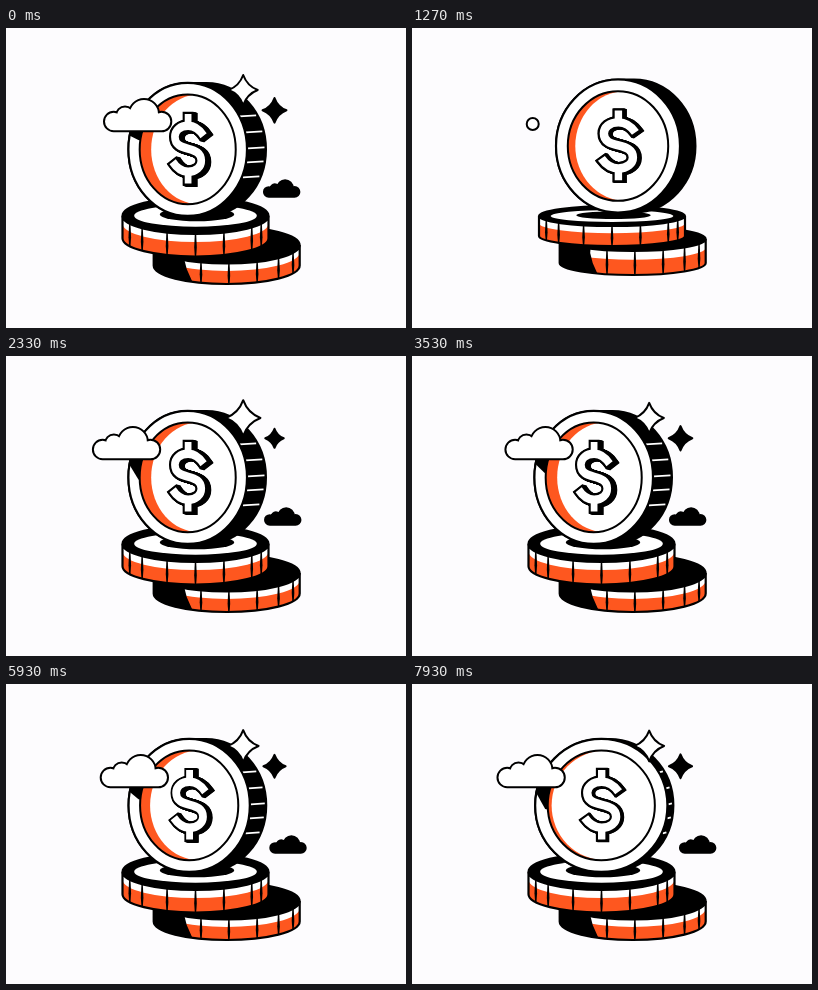
Recreate the animation shown at these times as an HTML page with a canvas. Size 400x300 px, loop 8000 ms.

```html
<!DOCTYPE html>
<html lang="en">
<head>
<meta charset="utf-8">
<title>Coins</title>
<style>
  html, body { margin: 0; width: 100%; height: 100%; overflow: hidden; background: #fdfcfe; }
  canvas { display: block; width: 400px; height: 300px; }
</style>
</head>
<body>
<canvas id="stage"></canvas>
<script>
const LOOP = 8000, STEP = 1000 / 15, TAU = Math.PI * 2;
const INK = '#000', PAPER = '#fff', ORANGE = '#fe571f', BACKDROP = '#fdfcfe';
const canvas = document.getElementById('stage');
const ctx = canvas.getContext('2d');
const ratio = window.devicePixelRatio || 1;
canvas.width = 400 * ratio;
canvas.height = 300 * ratio;

const lerp = (a, b, u) => a + (b - a) * u;
const part = (t, from, to) => Math.min(1, Math.max(0, (t - from) / (to - from)));
const smooth = u => u * u * (3 - 2 * u);
const easeOut = u => 1 - (1 - u) ** 3;
const backOut = (u, s) => 1 + (s + 1) * (u - 1) ** 3 + s * (u - 1) ** 2;

function paint(fill, stroke, width) {
  if (fill) { ctx.fillStyle = fill; ctx.fill(); }
  if (stroke) { ctx.strokeStyle = stroke; ctx.lineWidth = width; ctx.stroke(); }
}

function oval(cx, cy, rx, ry) {
  ctx.beginPath();
  ctx.ellipse(cx, cy, rx, ry, 0, 0, TAU);
}

function polygon(...points) {
  ctx.beginPath();
  points.forEach(([x, y]) => ctx.lineTo(x, y));
  ctx.closePath();
}

// Draws scaled around a point and lifted by dy.
function placed(x, y, scale, dy, draw) {
  if (scale <= 0.01) return;
  ctx.save();
  ctx.translate(x, y + dy);
  ctx.scale(scale, scale);
  ctx.translate(-x, -y);
  draw();
  ctx.restore();
}

function sidePath({ cx, cy, rx, ry, h }, drop = 0) {
  ctx.beginPath();
  ctx.ellipse(cx, cy + drop, rx, ry, 0, Math.PI, 0, true);
  ctx.ellipse(cx, cy + h, rx, ry, 0, 0, Math.PI);
  ctx.closePath();
}

function disc(d) {
  const { cx, cy, rx, ry, h } = d;
  oval(cx, cy, rx, ry);
  paint(INK, INK, 2);

  sidePath(d);
  paint(PAPER);
  ctx.save();
  ctx.clip();
  sidePath(d, h * 0.36);
  paint(ORANGE);
  for (const angle of d.ticks) {
    const x = cx + rx * Math.sin(angle), y = cy + ry * Math.cos(angle);
    polygon([x - 0.7, y], [x + 0.7, y], [x + 1.3, y + h * 0.6], [x + 0.6, y + h + 1], [x - 0.6, y + h + 1], [x - 1.3, y + h * 0.6]);
    paint(INK);
  }
  if (d.shaded) {
    polygon([cx - 80, cy - 20], [cx - 40, cy - 20], [cx - 42.5, cy + 14], [cx - 40, cy + 24], [cx - 32, cy + 42], [cx - 80, cy + 42]);
    paint(INK);
  }
  ctx.restore();
  sidePath(d);
  paint(null, INK, 2.2);

  if (!d.shaded) {
    oval(cx, cy, rx * 0.84, ry * 0.6);
    paint(PAPER);
    oval(cx + 1.5, cy - ry * 0.07, rx * 0.51, ry * 0.38);
    paint(INK);
  }
}

function dollarPath(extra) {
  const ex = extra * 0.58, ey = extra * 0.81;
  ctx.beginPath();
  ctx.moveTo(17 + ex, -13 + ey);
  ctx.lineTo(17, -13);
  ctx.bezierCurveTo(12, -20, 6, -23, 0, -23);
  ctx.bezierCurveTo(-9, -23, -14.5, -18, -14.5, -12);
  ctx.bezierCurveTo(-14.5, -4, -8, -2, 0, 0);
  ctx.bezierCurveTo(8, 2, 14.5, 4, 14.5, 12);
  ctx.bezierCurveTo(14.5, 18, 9, 23, 0, 23);
  ctx.bezierCurveTo(-7, 23, -12, 20, -17, 13);
  ctx.lineTo(-17 - ex, 13 - ey);
}

function dollarLayer(color, width, extra) {
  dollarPath(extra);
  paint(null, color, width);
  ctx.beginPath();
  for (const side of [-1, 1]) {
    ctx.moveTo(0, side * 22);
    ctx.lineTo(0, side * (34.8 + extra));
  }
  paint(null, color, width - 1);
}

function dollar(x, y, squeeze, depth) {
  ctx.save();
  ctx.translate(x, y);
  ctx.scale(squeeze, 1);
  for (let d = depth; d >= 0; d -= 0.5) {
    ctx.save();
    ctx.translate(d, d * 0.25);
    dollarLayer(INK, 13, 2.2);
    ctx.restore();
  }
  dollarLayer(PAPER, 8.4, 0);
  ctx.restore();
}

function standingCoin(c) {
  const { cx, cy, rx, ry, backX, backRx } = c;
  ctx.beginPath();
  ctx.ellipse(cx, cy, rx, ry, 0, Math.PI / 2, Math.PI * 1.5);
  ctx.ellipse(backX, cy, backRx, ry, 0, -Math.PI / 2, Math.PI / 2);
  ctx.closePath();
  paint(INK, INK, 2);

  if (c.ridges) {
    for (const dy of [-34, -18, -2, 12, 27]) {
      const reach = Math.sqrt(1 - (dy / ry) ** 2);
      const from = cx + rx * reach + 1, to = backX + backRx * reach - 1.5;
      ctx.beginPath();
      ctx.moveTo(from, cy + dy + 1);
      ctx.lineTo(Math.max(from, to), cy + dy);
      paint(null, PAPER, 1.8);
    }
  }

  oval(cx, cy, rx, ry);
  paint(PAPER, INK, 2.2);
  if (c.shadow > 0) {
    const left = cx - rx, top = cy - 20.5;
    ctx.save();
    ctx.clip();
    polygon([left - 2, top], [left + 22, top], [left + 14, top + c.shadow + 1], [left + 10, top + c.shadow], [left, top + 6]);
    paint(INK);
    ctx.restore();
  }

  const innerRx = rx * 0.81, innerRy = ry * 0.825;
  oval(cx, cy, innerRx, innerRy);
  paint(ORANGE);
  ctx.save();
  ctx.clip();
  oval(cx + c.crescent, cy, innerRx, innerRy);
  paint(PAPER);
  ctx.restore();
  oval(cx, cy, innerRx, innerRy);
  paint(null, INK, 2);
  dollar(cx + 0.4, cy - 0.6, c.squeeze, c.depth);
}

// Lobes spread out from one bubble as grow goes from 0 to 1.
function cloud(x, y, scale, grow, bubble, fill) {
  const lobes = [[9.7, 22.5, 9.7], [21, 16.5, 9], [40, 15, 15], [57.5, 22.5, 9.8]]
    .map(([lx, ly, r]) => [lerp(35, lx, grow), lerp(25, ly, grow), lerp(6, r, grow) * bubble]);
  const first = lobes[0], last = lobes[3];
  ctx.save();
  ctx.translate(x, y);
  ctx.scale(scale, scale);
  for (const [color, pad] of [[INK, 1], [fill, -1]]) {
    ctx.beginPath();
    for (const [lx, ly, r] of lobes) {
      ctx.moveTo(lx + r, ly);
      ctx.arc(lx, ly, Math.max(0, r + pad), 0, TAU);
    }
    ctx.rect(first[0], first[1] - 3, last[0] - first[0], first[2] + pad + 3);
    paint(color);
  }
  ctx.restore();
}

function star(x, y, r, fill) {
  const rx = r * 0.97, bend = 0.27;
  ctx.beginPath();
  ctx.moveTo(x, y - r);
  for (const [sx, sy, tx, ty] of [[1, -1, 1, 0], [1, 1, 0, 1], [-1, 1, -1, 0], [-1, -1, 0, -1]])
    ctx.quadraticCurveTo(x + sx * rx * bend, y + sy * r * bend, x + tx * rx, y + ty * r);
  ctx.closePath();
  ctx.lineJoin = 'round';
  paint(fill, INK, 2);
}

function draw(t) {
  ctx.setTransform(ratio, 0, 0, ratio, 0, 0);
  ctx.fillStyle = BACKDROP;
  ctx.fillRect(0, 0, 400, 300);

  const leaving = t < 800;
  if (!leaving && t < 866) return;

  const exit = (from, to) => leaving ? 1 - smooth(part(t, from, to)) : 1;
  const fall = (from, to) => leaving ? 0 : -270 * (1 - part(t, from, to) ** 2);
  const tilt = leaving ? 0 : 1 - easeOut(part(t, 1267, 1720));
  const turn = smooth(part(t, 5000, 8400));
  const cloudX = leaving ? 98 : 91.6 + 6.2 * Math.cos(TAU * (t - 4850) / 6500);
  const cloudGrow = leaving ? 1 : backOut(part(t, 1267, 1700), 1.2);

  placed(220.5, 230, exit(470, 730), fall(820, 1060), () => disc({
    cx: 220.7, cy: 217 - 6 * tilt, rx: 73, ry: 18.5 - 6.5 * tilt, h: 20.5 + 3.5 * tilt,
    ticks: [-0.36, 0.03, 0.43, 0.79, 1.14], shaded: true
  }));

  placed(190, 203, exit(330, 600), fall(910, 1140), () => disc({
    cx: 189.5 + 10.5 * tilt, cy: 187.7 + 0.3 * tilt, rx: 73, ry: 18.3 - 8.3 * tilt, h: 22.5 - 2.5 * tilt,
    ticks: [-1.12, -0.82, -0.4, 0, 0.4, 0.88, 1.12]
  }));

  placed(190, 121, exit(200, 470), fall(1000, 1210), () => standingCoin({
    cx: 181.7 + 8 * turn + 24.3 * tilt,
    cy: 121.4 - 3.4 * tilt,
    rx: 59.3 + 7.2 * turn + 2.7 * tilt,
    ry: 66.5,
    backX: 200.5 - 3.5 * turn + 21.5 * tilt,
    backRx: 59.5 + 5 * turn + 2 * tilt,
    crescent: 11.5 - 8 * turn - 4 * tilt,
    squeeze: 0.91 + 0.09 * Math.max(turn, tilt),
    depth: 4.5 - 3 * turn - 2 * tilt,
    ridges: tilt < 0.5,
    shadow: leaving ? 11 : (11 + (98 - cloudX) * 1.05) * part(t, 1400, 1600)
  }));

  const small = exit(70, 330);
  const darkX = leaving ? 257
    : 257 + 10 * smooth(part(t, 4400, 7000)) + 1.5 * (1 - smooth(part(t, 1700, 3500)));
  const darkPop = leaving ? small : backOut(part(t, 1400, 1750), 1.7);
  placed(darkX + 18, 161, darkPop, 0, () => cloud(darkX + 0.5, 151.8, 0.54, 1, 1, INK));

  const pulse = Math.cos(TAU * (t - 2300) / 2150);
  const glow = leaving ? -1 + 2 * part(t, 0, 200) : pulse;
  const burst = leaving ? small : backOut(part(t, 1533, 2133), 3.6);
  const darkBurst = leaving ? small : backOut(part(t, 1600, 2133), 1.7);
  placed(237.2, 62, burst, 0, () => star(237.2, 62, 16.4 + 1.4 * glow, PAPER));
  placed(268.5, 82.3, darkBurst, 0, () => star(268.5, 82.3, 10.9 - 1.4 * glow, INK));

  const bubble = leaving ? 1 : part(t, 1200, 1266);
  if (bubble > 0)
    placed(cloudX + 34, 90, small, 0, () => cloud(cloudX, 71, 1, cloudGrow, bubble, PAPER));
}

const start = performance.now();
function frame() {
  const elapsed = (performance.now() - start) % LOOP;
  draw(Math.floor((elapsed + 5) / STEP) * STEP % LOOP);
  requestAnimationFrame(frame);
}
frame();
</script>
</body>
</html>
```
